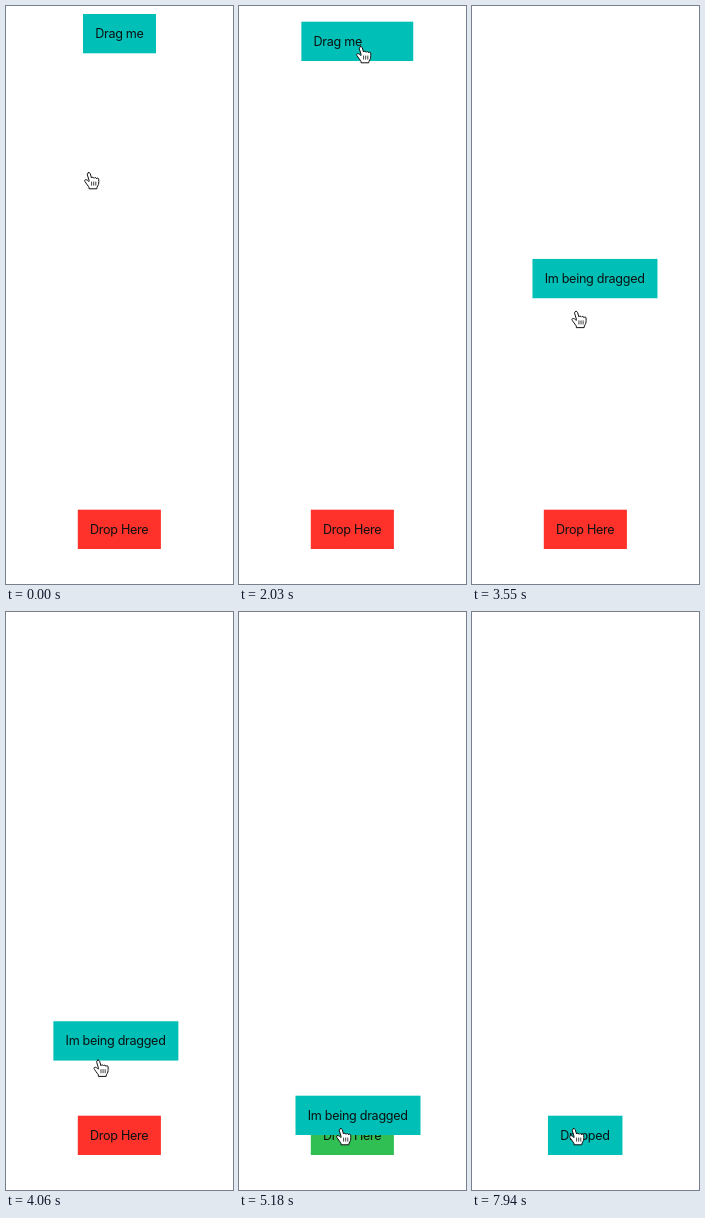
An HTML page for the animation above (8.21 s loop, 227x578 px).

```html
<!DOCTYPE html>
<html lang="en">
<head>
<meta charset="utf-8">
<title>Drag and drop</title>
<style>
  html, body { margin: 0; width: 100%; height: 100%; overflow: hidden; background: #fff; }
  svg { display: block; width: 100%; height: 100%; }
  text { font: 12.6px Inter, "Open Sans", sans-serif; letter-spacing: -0.3px; fill: #0b1212; }
</style>
</head>
<body>
<svg viewBox="0 0 227 578">
  <g id="target" transform="translate(71.8 503.7)">
    <rect id="zone" width="83.1" height="39.3"/>
    <text x="12.2" y="24.1">Drop Here</text>
  </g>
  <g id="box">
    <rect id="tile" height="39.3" fill="#00bfb6"/>
    <text id="idle" x="12.2" y="24.1">Drag me</text>
    <text id="held" x="12.2" y="24.1">Im being dragged</text>
    <text id="done" x="12.2" y="24.1">Dropped</text>
  </g>
  <g id="hand" stroke="#111" stroke-linecap="round" stroke-linejoin="round">
    <path fill="#fff" d="M4.6.6C3.4.7 3 1.8 3.4 3L5 8.2 4.9 9.6C4 8.4 2.6 7.4 1.4 7.7.4 8 .4 9 1.1 9.8 2.4 11.3 3 12.8 4.2 14.2L5 15.2V16.8H12.8L13 15.2C14.4 13.4 14.8 11.6 14.8 9.6L14.7 7.2C14.6 5.9 13 5.7 12.6 6.8 12.4 5.4 10.6 5.2 10.1 6.3 9.7 5 7.9 4.9 7.5 6L6.3 1.8C6 .9 5.4.5 4.6.6Z"/>
    <path fill="none" stroke-width=".8" d="M7.6 10V13.2M9.7 10V13.2M11.8 10V13.2"/>
  </g>
</svg>
<script>
const LOOP = 8210, GRAB = 1840, WIDEN = 1900, SWAP = 2060, HOVER = 4740, DROP = 6820;
const LAG = 50; // the box trails the hand
const $ = id => document.getElementById(id);
const clamp = v => Math.max(0, Math.min(1, v));
const mix = (a, b, k) => a + (b - a) * k;
const ease = (t, from, to) => {
  const v = clamp((t - from) / (to - from));
  return v * v * (3 - 2 * v);
};

// eased strokes of the hand; overlapping strokes add up
const strokes = [
  { from: 60, to: 900, dx: 34, dy: -134 },
  { from: GRAB, to: 2000, dx: 5, dy: 8 },
  { from: 2300, to: 2900, dx: 0, dy: 54 },
  { from: 2790, to: 4150, dx: -30, dy: 358 },
  { from: 4608, to: 4760, dx: 0, dy: 64 },
  { from: 4720, to: 5050, dx: 10, dy: 0 }
];

function handAt(t) {
  let x = 78, y = 166;
  for (const s of strokes) {
    const k = ease(t, s.from, s.to);
    x += s.dx * k;
    y += s.dy * k;
  }
  return { x, y };
}

// centre and top of the box
function boxAt(t) {
  if (t < GRAB) return { x: 113.5, y: 8 };
  if (t >= DROP) return { x: 113.2, y: 503.7 };
  const hand = handAt(t - LAG), k = ease(t, SWAP, 2210);
  return { x: hand.x + mix(1.5, 22, k), y: hand.y + mix(-24, -32.3, k) };
}

const place = (el, x, y) => el.setAttribute("transform", `translate(${x.toFixed(2)} ${y.toFixed(2)})`);
const fade = (id, v) => $(id).setAttribute("opacity", v);

function draw(t) {
  const dropped = t >= DROP;
  const width = dropped ? 74.5 : mix(73, 125, ease(t, WIDEN, WIDEN + 195));
  const box = boxAt(t), hand = handAt(t);
  $("tile").setAttribute("width", width.toFixed(2));
  place($("box"), box.x - width / 2, box.y);
  place($("hand"), hand.x, hand.y);

  const held = clamp((t - SWAP) / 90);
  fade("idle", dropped ? 0 : 1 - held);
  fade("held", dropped ? 0 : held);
  fade("done", dropped ? 1 : 0);
  fade("target", dropped ? 0 : 1);

  const k = ease(t, HOVER, HOVER + 350);
  const rgb = [[255, 48], [49, 191], [43, 82]].map(([a, b]) => Math.round(mix(a, b, k)));
  $("zone").setAttribute("fill", `rgb(${rgb})`);
}

const start = performance.now();
function tick() {
  draw((performance.now() - start) % LOOP);
  requestAnimationFrame(tick);
}
tick();
</script>
</body>
</html>
```
